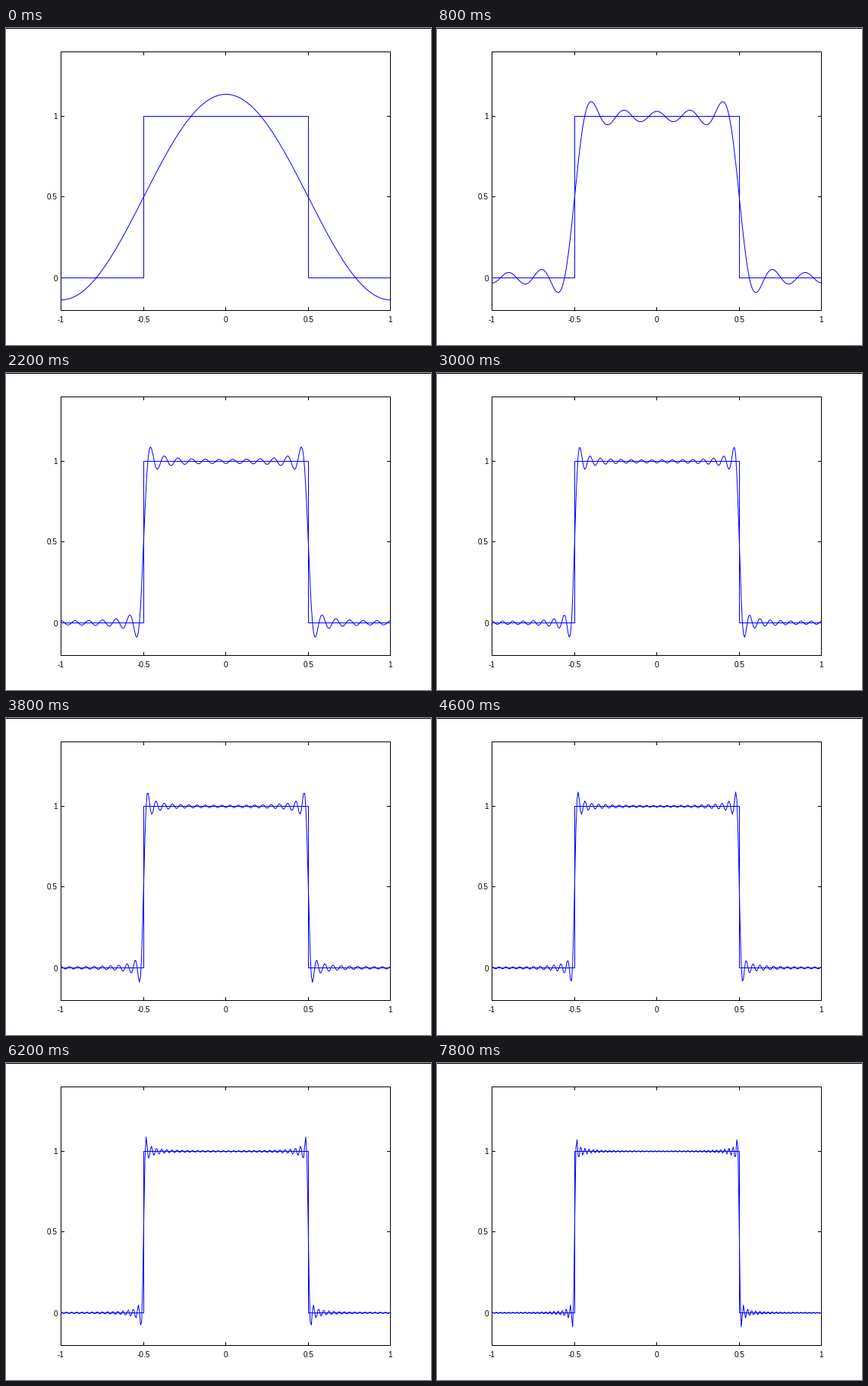
A matplotlib script for the animation above (8000 ms loop, 560 by 418 pixels).

```python
import numpy as np
import matplotlib.pyplot as plt
from matplotlib.animation import FuncAnimation

W, H, DPI = 560, 418, 100
FRAMES, INTERVAL = 40, 200
PX = 72 / DPI  # one pixel in points
LEFT, RIGHT = 0.13 * W, 0.905 * W
TOP, BOTTOM = 0.075 * H, 0.89 * H
XMIN, XMAX, YMIN, YMAX = -1, 1, -0.2, 1.4
TICK = 4.5

plt.rcParams["font.family"] = "Liberation Sans"
plt.rcParams["path.snap"] = False

fig = plt.figure(figsize=(W / DPI, H / DPI), dpi=DPI, facecolor="white")
ax = fig.add_axes([0, 0, 1, 1])
ax.set_xlim(0, W)
ax.set_ylim(H, 0)
ax.axis("off")


def to_px(x, y):
    x, y = np.asarray(x, float), np.asarray(y, float)
    return (LEFT + (x - XMIN) / (XMAX - XMIN) * (RIGHT - LEFT),
            BOTTOM - (y - YMIN) / (YMAX - YMIN) * (BOTTOM - TOP))


def crisp(v):
    return np.floor(v) + 0.5


def stroke(x, y, color="black", z=2, **kw):
    return ax.plot(x, y, color=color, lw=PX, zorder=z,
                   solid_capstyle="butt", **kw)[0]


def label(x, y, text, ha):
    ax.text(x, y, text, ha=ha, va="baseline", fontsize=10 * PX)


l, r, t, b = crisp(np.array([LEFT, RIGHT, TOP, BOTTOM]))
stroke([0, W], [0.5, 0.5])
stroke([l, r, r, l, l], [t, t, b, b, t], solid_joinstyle="miter")

for v in (-1, -0.5, 0, 0.5, 1):
    x = crisp(to_px(v, 0)[0])
    stroke([x, x], [t, t + TICK])
    stroke([x, x], [b - TICK, b])
    label(x, 388, f"{v:g}", "center")

for v in (0, 0.5, 1):
    y = crisp(to_px(0, v)[1])
    stroke([l, l + TICK], [y, y])
    stroke([r - TICK, r], [y, y])
    label(68, y + 4, f"{v:g}", "right")

pulse = to_px([-1, -0.5, -0.5, 0.5, 0.5, 1], [0, 0, 1, 1, 0, 0])
stroke(*map(crisp, pulse), color="blue", z=3, solid_joinstyle="miter")

grid = np.linspace(-1, 1, 300)
curve = stroke([], [], color="blue", z=4, solid_joinstyle="round")


def partial_sum(terms):
    total = np.full_like(grid, 0.5)
    for k in range(terms):
        n = 2 * k + 1
        total += (-1) ** k * 2 / (np.pi * n) * np.cos(n * np.pi * grid)
    return total


def update(i):
    curve.set_data(*to_px(grid, partial_sum(i + 1)))
    return (curve,)


anim = FuncAnimation(fig, update, frames=FRAMES, interval=INTERVAL,
                     repeat=True, repeat_delay=0)
plt.show()
```
